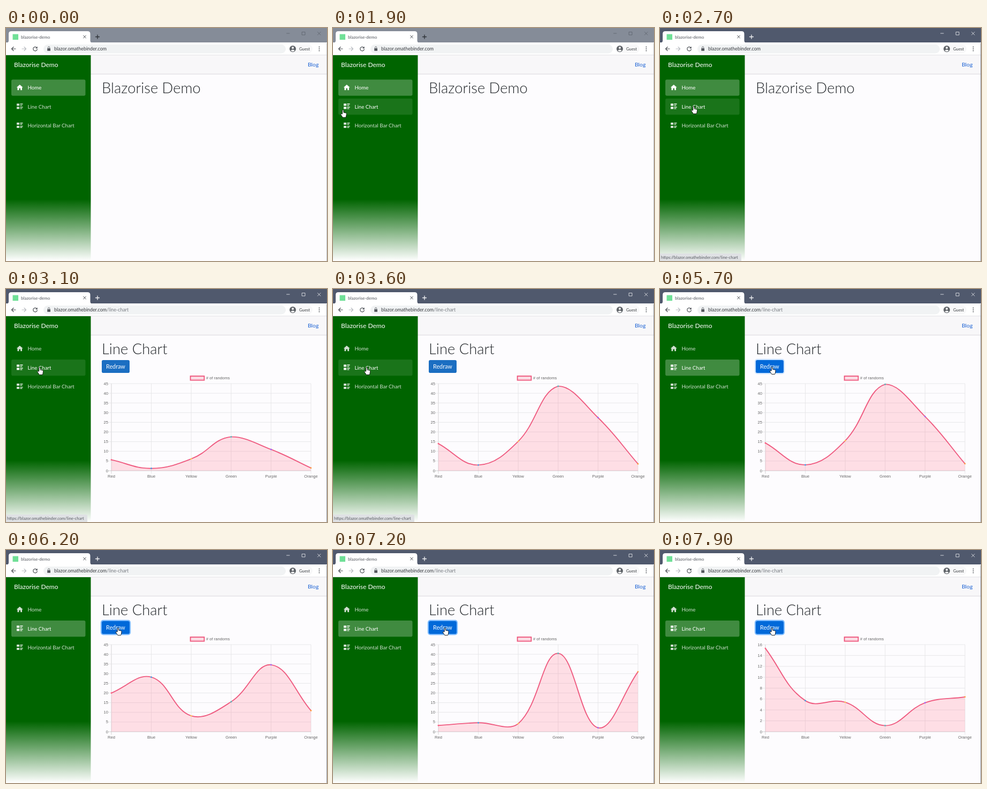
These frames come from a looping animation (600 by 436 pixels, 8000 ms). An HTML page:

```html
<!DOCTYPE html>
<html lang="en">
<head>
<meta charset="utf-8">
<title>Blazorise Demo</title>
<style>
  html, body { margin: 0; width: 100%; height: 100%; overflow: hidden; background: #fdfcfe; }
  svg { display: block; width: 600px; height: 436px; font-family: Lato, "Open Sans", sans-serif; }
  .line { fill: none; stroke-linecap: round; stroke-linejoin: round; }
  .nav { font-size: 9.7px; }
  .h1 { font-size: 27.4px; font-weight: 300; fill: #212529; }
  #chart text { font: 7.6px "Liberation Sans", Arial, sans-serif; fill: #666; }
</style>
</head>
<body>
<svg viewBox="0 0 600 436" xmlns="http://www.w3.org/2000/svg">
  <defs>
    <linearGradient id="side" gradientUnits="userSpaceOnUse" x1="0" y1="51" x2="0" y2="436">
      <stop offset="0" stop-color="#006400"/>
      <stop offset=".7" stop-color="#006400"/>
      <stop offset="1" stop-color="#fff"/>
    </linearGradient>
    <g id="list">
      <path d="M0 0h5v4H0zM0 6h5v4H0zM6.3 0h5.2v1.4H6.3zM6.3 2.6h4v1.4h-4zM6.3 6h5.2v1.4H6.3zM6.3 8.6h4V10h-4z"/>
    </g>
  </defs>

  <!-- page -->
  <rect width="600" height="436" fill="#fdfcfe"/>
  <rect x="158" y="51" width="442" height="35" fill="#f8f7f9"/>
  <path d="M158 86.2H600" stroke="#d6d5d8" stroke-width=".9"/>
  <text x="564" y="71.5" font-size="10.4" fill="#1b62d4">Blog</text>
  <rect y="50" width="158.5" height="386" fill="url(#side)"/>
  <text x="15" y="73" font-size="12" fill="#fff">Blazorise Demo</text>
  <g id="rows" fill="#fff"></g>

  <g id="home"><text class="h1" x="179" y="121.5">Blazorise Demo</text></g>
  <g id="linePage">
    <text class="h1" x="179" y="121.5">Line Chart</text>
    <rect id="ring" x="177.9" y="131.9" width="54.2" height="26.2" rx="4" fill="none" stroke="#7fbcff" stroke-width="2.2"/>
    <rect id="btn" x="179" y="133" width="52" height="24" rx="2.8"/>
    <text x="187" y="148.5" font-size="10.8" fill="#fff">Redraw</text>
    <g id="chart">
      <rect x="344.7" y="163" width="25.8" height="7.6" fill="#fbdbe3" stroke="#ef5b80" stroke-width="1.9"/>
      <text x="374" y="169.3"># of randoms</text>
      <g id="grid"></g>
      <path id="area" fill="#ff6384" fill-opacity=".2"/>
      <path id="curve" class="line" stroke="#ef5b80" stroke-width="1.9"/>
      <g id="dots"></g>
    </g>
  </g>

  <!-- browser frame -->
  <rect id="bar" width="600" height="28"/>
  <path d="M1 27.5q4 0 4-4V11q0-5 5-5h142.500q5 0 5 5v12.500q0 4 4 4z" fill="#fff"/>
  <rect y="27" width="600" height="23.500" fill="#fff"/>
  <path d="M0 50.500H600" stroke="#dcdde0" stroke-width=".8"/>
  <rect x="12.500" y="11.500" width="10.500" height="10.500" fill="#70e097"/>
  <text x="28" y="19.500" font-size="8.100" fill="#50545b">blazorise-demo</text>
  <path class="line" d="M144.600 14l4.800 4.800m0-4.800l-4.800 4.800" stroke="#45494f"/>
  <path id="plus" class="line" d="M167.500 16.500h7m-3.500-3.500v7" stroke-width="1.300"/>
  <path id="winBtns" class="line" d="M524.500 10h5.500M553.500 7.500h5.500v5.500h-5.500zM582.500 7.500l5.500 5.500m0-5.500l-5.500 5.500" stroke-width=".8"/>
  <path class="line" d="M18 39H10.500m3.500-3.500L10.500 39l3.500 3.500" stroke="#4c5056" stroke-width="1.200"/>
  <path class="line" d="M30 39h7.500m-3.500-3.500l3.500 3.500-3.500 3.500" stroke="#b9bcc1" stroke-width="1.200"/>
  <path class="line" d="M57.600 36.800a3.800 3.800 0 1 0 .7 3" stroke="#4c5056" stroke-width="1.200"/>
  <path d="M58.700 34.500v3.700H55z" fill="#4c5056"/>
  <rect x="70" y="31" width="453" height="16.500" rx="8.250" fill="#f1f3f4"/>
  <rect x="77.200" y="38" width="5.800" height="4.800" rx=".6" fill="#54585e"/>
  <path class="line" d="M78.500 38v-1.500a1.600 1.600 0 0 1 3.200 0V38" stroke="#54585e" stroke-width=".9"/>
  <text x="90" y="42.200" font-size="8.900" fill="#34373c">blazor.omathebinder.com<tspan id="path" fill="#767a80">/line-chart</tspan></text>
  <rect x="528" y="31" width="45" height="16" rx="8" fill="#f8f8f9"/>
  <circle cx="536" cy="39" r="6" fill="#5f6368"/>
  <circle cx="536" cy="37" r="2" fill="#fff"/>
  <path d="M532.200 42.300q3.800-3.600 7.600 0q-3.800 3.600-7.600 0z" fill="#fff"/>
  <text x="548" y="41.800" font-size="7.750" fill="#3c4043">Guest</text>
  <g fill="#54585e"><circle cx="585.500" cy="35.500" r="1"/><circle cx="585.500" cy="39" r="1"/><circle cx="585.500" cy="42.500" r="1"/></g>
  <path id="edge" d="M599.600 28V436" stroke-width=".8"/>

  <g id="status">
    <path d="M0 422h149q3 0 3 3v11H0z" fill="#dfe1e4"/>
    <text x="2" y="431.700" font-size="7.630" fill="#55595f">https://blazor.omathebinder.com/line-chart</text>
  </g>
  <g id="pointer" stroke="#111" stroke-width=".9" stroke-linejoin="round" fill="#fff">
    <path id="hand" d="M-1.300 7V.8a1.200 1.200 0 0 1 2.400 0V4.200l4 .9c1 .3 1.500 1 1.400 2l-.5 4-1 2.400H-.6l-3.500-5.200c-.6-1 .5-1.900 1.400-1.200z"/>
    <path id="arrow" d="M0 0v14l3.200-3 2.200 5 2.200-1-2.200-4.800h4.500z"/>
  </g>
</svg>
<script>
const LOOP = 8000;
const $ = id => document.getElementById(id);
const set = (el, attrs) => { for (const k in attrs) el.setAttribute(k, attrs[k]); return el; };
const add = (parent, tag, attrs) =>
  parent.appendChild(set(document.createElementNS('http://www.w3.org/2000/svg', tag), attrs));
const show = (id, on) => { $(id).style.display = on ? '' : 'none'; };
const clamp = v => Math.max(0, Math.min(1, v));
const easeOutQuart = x => 1 - (1 - clamp(x)) ** 4;

// Sidebar
const rows = ['Home', 'Line Chart', 'Horizontal Bar Chart'].map((label, i) => {
  const y = 96.5 + i * 35.4;
  const box = add($('rows'), 'rect', { x: 10, y, width: 138.5, height: 30.3, rx: 2.8 });
  const item = add($('rows'), 'g', {});
  if (i) add(item, 'use', { href: '#list', x: 20, y: y + 9.7 });
  else add(item, 'path', { d: 'M25.700 106l6 5.300h-1.700v4.900h-3v-3.500h-2.600v3.500h-3v-4.900H19.700z' });
  add(item, 'text', { x: 40.5, y: y + 18.6, class: 'nav' }).textContent = label;
  return { box, item };
});

// Chart
const X0 = 197, DX = 74.6, TOP = 177, BASE = 340;
const labels = ['Red', 'Blue', 'Yellow', 'Green', 'Purple', 'Orange'];
const colors = ['#ff6384', '#36a2eb', '#ffce56', '#4bc0c0', '#9966ff', '#ff9f40'];
const draws = [
  { at: 2984, max: 45, step: 5, data: [14.3, 3, 15.5, 44.6, 28, 3.6] },
  { at: 5750, max: 45, step: 5, data: [22, 31, 9, 17, 38, 12] },
  { at: 6500, max: 45, step: 5, data: [3.25, 4.65, 4.2, 40.8, 2.05, 31.2] },
  { at: 7300, max: 16, step: 2, data: [15.7, 5.85, 5.55, 1.15, 5.45, 6.55] }
];
const dots = colors.map((fill, i) => add($('dots'), 'circle', { cx: X0 + i * DX, r: 1.4, fill }));

function drawGrid({ max, step }) {
  const g = $('grid');
  g.textContent = '';
  const rule = (d, stroke) => add(g, 'path', { d, stroke, 'stroke-width': .8 });
  labels.forEach((label, i) => {
    const x = X0 + i * DX;
    rule(`M${x} ${TOP}V${BASE + 5.5}`, i ? '#e3e2e5' : '#c9c8cb');
    add(g, 'text', { x, y: 353, 'text-anchor': 'middle' }).textContent = label;
  });
  for (let v = 0; v <= max; v += step) {
    const y = BASE - v / max * (BASE - TOP);
    rule(`M${X0 - 5.5} ${y}H${X0 + 5 * DX}`, v ? '#e3e2e5' : '#c0bfc2');
    add(g, 'text', { x: 191, y: y + 2.6, 'text-anchor': 'end' }).textContent = v;
  }
}

// Cardinal spline with tension 0.4, handles kept inside the plot
function spline(pts) {
  const cap = y => Math.max(TOP, Math.min(BASE, y));
  const handles = pts.map((p, i) => {
    const a = pts[i - 1] || p, b = pts[i + 1] || p;
    const da = Math.hypot(p[0] - a[0], p[1] - a[1]), db = Math.hypot(b[0] - p[0], b[1] - p[1]);
    const at = k => [p[0] + k * (b[0] - a[0]), cap(p[1] + k * (b[1] - a[1]))];
    return [at(-.4 * da / (da + db)), at(.4 * db / (da + db))];
  });
  return pts.slice(1).map((p, i) => [handles[i][1], handles[i + 1][0], p]);
}

let shown = null;
function drawChart(t) {
  const cur = draws.filter(d => t >= d.at).pop() || draws[0];
  if (cur !== shown) drawGrid(shown = cur);
  const grow = easeOutQuart((t - cur.at) / 1000);
  const pts = cur.data.map((v, i) => [X0 + i * DX, BASE - v / cur.max * (BASE - TOP)]);
  const at = ([x, y]) => `${x.toFixed(2)} ${(BASE + (y - BASE) * grow).toFixed(2)}`;
  const d = `M${at(pts[0])}` + spline(pts).map(s => 'C' + s.map(at).join(' ')).join('');
  set($('curve'), { d });
  set($('area'), { d: `${d}V${BASE}H${X0}Z` });
  dots.forEach((dot, i) => set(dot, { cy: BASE + (pts[i][1] - BASE) * grow }));
}

// Pointer stops: time, x, y
const stops = [[1890, 17.5, 154], [2300, 63, 147], [4300, 63, 147], [4600, 167, 155], [4950, 209.5, 146]];
function pointerAt(t) {
  const i = stops.findIndex(s => s[0] > t);
  if (i < 0) return stops[stops.length - 1].slice(1);
  if (!i) return null;
  const [a, b] = [stops[i - 1], stops[i]];
  const k = (t - a[0]) / (b[0] - a[0]);
  return [a[1] + (b[1] - a[1]) * k, a[2] + (b[2] - a[2]) * k];
}

const FOCUS = 2500, NAVIGATE = 2750;
function render(t) {
  const pos = pointerAt(t), onPage = t >= NAVIGATE, focused = t >= FOCUS;
  const overRow = pos && pos[0] < 148.5, overBtn = pos && pos[0] > 179;

  set($('bar'), { fill: focused ? '#50596d' : '#858c98' });
  set($('plus'), { stroke: focused ? '#f2f3f5' : '#2c3036' });
  set($('winBtns'), { stroke: focused ? '#f2f3f5' : '#5c626d' });
  set($('edge'), { stroke: focused ? '#6a7180' : '#a4a8b0' });
  show('path', onPage);
  show('home', !onPage);
  show('linePage', onPage);
  show('chart', t >= draws[0].at - 40);
  show('status', focused && t < 5050);
  $('status').style.opacity = clamp((5050 - t) / 150);

  rows.forEach(({ box, item }, i) => {
    const active = i === (onPage ? 1 : 0), hover = overRow && i === 1;
    set(box, { 'fill-opacity': hover ? .1 : active ? .25 : 0 });
    set(item, { fill: hover || active ? '#fff' : '#d0dfd0' });
  });

  const tint = overBtn ? clamp((t - 4700) / 150) : 0;
  const mix = (a, b) => Math.round(a + (b - a) * tint);
  set($('btn'), { fill: `rgb(${mix(27, 0)},${mix(110, 105)},${mix(194, 217)})` });
  $('ring').style.opacity = clamp((t - 5640) / 150);

  show('pointer', pos);
  if (pos) {
    set($('pointer'), { transform: `translate(${pos[0].toFixed(2)} ${pos[1].toFixed(2)})` });
    show('hand', overRow || overBtn);
    show('arrow', !overRow && !overBtn);
  }
  drawChart(t);
}

const start = performance.now();
function tick() {
  render((performance.now() - start) % LOOP);
  requestAnimationFrame(tick);
}
tick();
</script>
</body>
</html>
```
